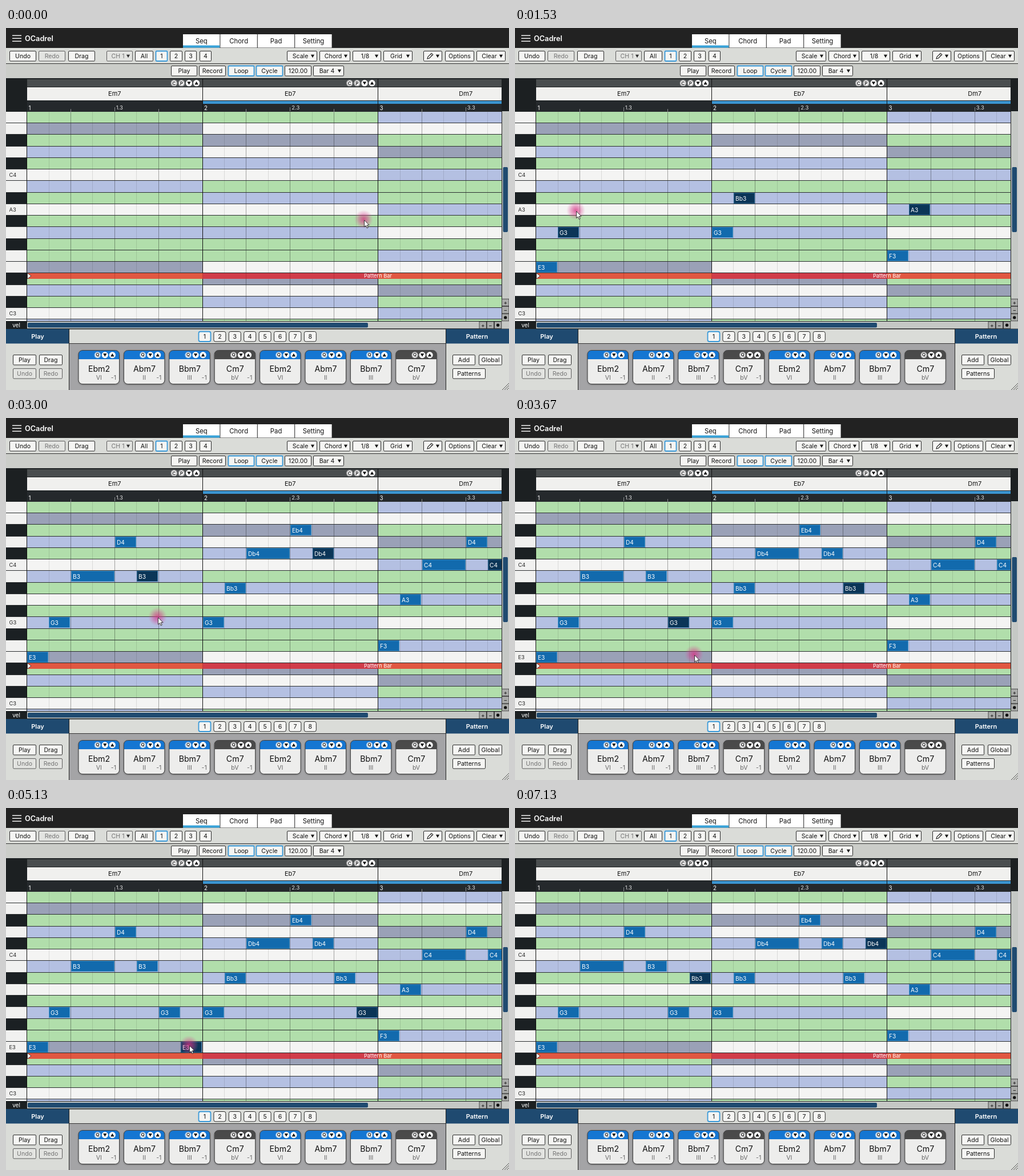
An HTML page with a canvas for the animation above (7.19 s loop, 881 by 635 pixels).

```html
<!DOCTYPE html>
<html lang="en">
<head>
<meta charset="utf-8">
<title>Sequencer</title>
<style>
html, body { margin: 0; width: 100%; height: 100%; overflow: hidden; background: #222; }
canvas { display: block; }
</style>
</head>
<body>
<canvas id="stage" width="881" height="635"></canvas>
<script>
const g = document.getElementById('stage').getContext('2d');
const LOOP = 7190, STEP = 1000 / 15;
const LEFT = 37, TOP = 145.8, RIGHT = 868, BOTTOM = 514;
const ROW = 20.25, BAR = 307.5, COL = BAR / 8;
const INK = '#1c2022', BLUE = '#3a9ad9', NAVY = '#1f4a70', PANEL = '#dadcd8', FACE = '#f5f5f3';
const PITCH = ['F', 'E', 'Eb', 'D', 'Db', 'C', 'B', 'Bb', 'A', 'Ab', 'G', 'Gb'];
const SHADE = { G: '#b1deab', B: '#b4c0e2', W: '#f4f4f3', D: '#9aa1b7' };
const BARS = ['GDGBGWBGWGBG', 'GWDWBWGBWGBG', 'BWGDGBGGBGWG'];

// column, length, press step, release step, row in each bar
const NOTES = [
  [0, 1, 15, 16, [13, 10, 12]],
  [1, 1, 20, 21, [10, 7, 8]],
  [2, 2, 26, 33, [6, 4, 5]],
  [4, 1, 37, 38, [3, 2, 3]],
  [5, 1, 43, 44, [6, 4, 5]],
  [6, 1, 50, 52, [10, 7, 8]],
  [7, 1, 57, 59, [13, 10, 12]]
];

// step, x, y of the pointer
const PATH = [
  [0, 627, 336], [10, 51, 420], [16, 51, 420], [19, 90, 356], [21, 92, 354],
  [25, 122, 287], [26, 124, 286], [32, 164, 283], [33, 167, 281], [36, 206, 221],
  [38, 208, 221], [41, 240, 280], [43, 242, 280], [45, 266, 349], [50, 277, 362],
  [52, 280, 364], [55, 314, 415], [67, 314, 415], [72, 326, 393], [77, 321, 416],
  [78, 321, 416], [85, 313, 299], [100, 313, 299], [106, 746, 154]
];

const rowY = r => Math.round(TOP + ROW * r);
const rowAt = y => Math.floor((y - TOP) / ROW);
const isBlack = r => PITCH[r % 12].length > 1;
const rowName = r => PITCH[r % 12] + (r < 6 ? 4 : r < 18 ? 3 : 2);

function rect(x, y, w, h, color) {
  g.fillStyle = color;
  g.fillRect(x, y, w, h);
}

function text(s, x, y, size, color = '#111', align = 'center', weight = 400) {
  g.font = `${weight} ${size}px Inter, sans-serif`;
  g.textAlign = align;
  g.fillStyle = color;
  g.fillText(s, x, y + size * 0.36);
}

function poly(points, fill, stroke, width = 1) {
  g.beginPath();
  points.forEach(([x, y]) => g.lineTo(x, y));
  g.closePath();
  if (fill) { g.fillStyle = fill; g.fill(); }
  if (stroke) { g.strokeStyle = stroke; g.lineWidth = width; g.stroke(); }
}

function line(x1, y1, x2, y2, color) {
  g.beginPath();
  g.moveTo(x1, y1);
  g.lineTo(x2, y2);
  g.strokeStyle = color;
  g.lineWidth = 1;
  g.stroke();
}

function triangle(x, y, r, dir, color) {
  poly([[x - r, y - r * 0.8 * dir], [x + r, y - r * 0.8 * dir], [x, y + r * 0.9 * dir]], color);
}

// style: 'on' has a blue frame, 'off' is greyed; a trailing ▼ makes a drop-down
function button(label, x1, x2, y, style, radius = 1.5, h = 17.5) {
  const menu = label.endsWith('▼'), off = style === 'off', on = style === 'on';
  g.beginPath();
  g.roundRect(x1 + 0.5, y + 0.5, x2 - x1 - 1, h, radius);
  g.fillStyle = off ? '#e3e4e1' : FACE;
  g.fill();
  g.lineWidth = on ? 1.8 : 1;
  g.strokeStyle = on ? BLUE : off ? '#5c5c5c' : '#2a2a2a';
  g.stroke();
  const cy = y + h / 2 + 0.6, color = off ? '#757575' : '#111';
  text(label.replace('▼', ''), (x1 + x2) / 2 - (menu ? 3 : 0), cy, 10.6, color);
  if (menu) triangle(x2 - 8, cy, 3.1, 1, off ? '#333' : '#111');
}

function badge(sign, x, y, color) {
  g.beginPath();
  g.arc(x, y, 5.6, 0, 7);
  g.fillStyle = '#fff';
  g.fill();
  if (sign === '▼' || sign === '▲') triangle(x, y, 3.2, sign === '▼' ? 1 : -1, '#111');
  else {
    g.beginPath();
    g.arc(x, y, 4.8, 0, 7);
    g.lineWidth = 0.6;
    g.strokeStyle = color;
    g.stroke();
    text(sign, x, y, 8, '#111', 'center', 600);
  }
}

function topBars() {
  rect(0, 0, 881, 35, '#222');
  for (const y of [12.5, 17.5, 22.5]) rect(11, y, 16, 1.4, '#fff');
  text('OCadrel', 33, 18.5, 12.7, '#fff', 'left', 600);
  ['Seq', 'Chord', 'Pad', 'Setting'].forEach((s, i) => {
    rect(310 + i * 65.4, 11, 64.4, 23.5, '#fff');
    text(s, 342.3 + i * 65.4, 23, 11.3);
  });
  rect(310, 30.5, 64.4, 4, '#38a3d9');

  rect(0, 35, 881, 27, PANEL);
  rect(0, 63, 881, 25, '#cbcdc9');
  rect(0, 62, 881, 1, '#333');
  [['Undo', 6, 53], ['Redo', 57, 104, 'off'], ['Drag', 109, 156], ['CH 1▼', 176, 222, 'off'],
   ['All', 226, 258], ['1', 262, 283, 'on'], ['2', 287, 309], ['3', 313, 334], ['4', 339, 360],
   ['Scale▼', 492, 545], ['Chord▼', 549, 603], ['1/8▼', 607, 657], ['Grid▼', 661, 712],
   ['▼', 731, 764], ['Options', 769, 820], ['Clear▼', 824, 875]
  ].forEach(([s, a, b, style]) => button(s, a, b, 40, style));
  poly([[738, 54], [739, 50.5], [745.3, 44.2], [747.8, 46.7], [741.5, 53]], null, '#222', 1.1);
  line(743.5, 46, 746, 48.5, '#222');
  [['Play', 289, 335], ['Record', 338, 385], ['Loop', 389, 435, 'on'], ['Cycle', 438, 485, 'on'],
   ['120.00', 488, 535], ['Bar 4▼', 538, 592]
  ].forEach(([s, a, b, style]) => button(s, a, b, 66, style));
}

function chordHeader() {
  rect(0, 88, 881, 58, INK);
  rect(LEFT, 90, RIGHT - LEFT, 13, '#4a4e4f');
  rect(LEFT, 104, RIGHT - LEFT, 23, '#f0f0ee');
  rect(LEFT, 128, RIGHT - LEFT, 18, '#25292c');
  rect(345, 128, RIGHT - 345, 5, '#3a94d0');
  ['Em7', 'Eb7', 'Dm7'].forEach((s, b) => {
    const x = LEFT + BAR * b;
    text(s, x + BAR / 2 - 0.5, 115.5, 11);
    text(b + 1, x + 2.5, 140, 9.8, '#fff', 'left');
    text(`${b + 1}.3`, x + BAR / 2 + 2, 140, 9.5, '#ddd', 'left');
    [1, 2, 3].forEach(i => rect(Math.floor(x + i * BAR / 4 - 0.5), i === 2 ? 139 : 142, 1, 7, '#8a8d8f'));
    if (b < 2) ['C', 'P', '▼', '▲'].forEach((c, i) => badge(c, x + 257.3 + i * 13.1, 96.7, '#333'));
    if (b) rect(Math.floor(x - 0.5), 89, 1, 57, '#111');
  });
}

function roll(hover) {
  g.save();
  g.beginPath();
  g.rect(0, 146, RIGHT, BOTTOM - 146);
  g.clip();
  for (let r = 0; r < 19; r++) {
    const y = rowY(r);
    rect(0, y, 36, 21, isBlack(r) ? '#1b2023' : '#f1f1f0');
    BARS.forEach((bar, b) => rect(LEFT + BAR * b, y, BAR, 21, SHADE[bar[r % 12]]));
  }
  for (let i = 1; i < 24; i++) {
    if (i % 8) rect(Math.floor(LEFT + i * COL - 0.4), 146, 1, 368, i % 2 ? 'rgba(0,0,0,.11)' : 'rgba(0,0,0,.34)');
  }
  for (let r = 0; r < 19; r++) rect(0, rowY(r), RIGHT, 1, '#2b2e30');
  for (const x of [36, 344, 651]) rect(x, 146, 1, 368, '#111');
  for (const r of new Set([5, 17, hover])) {
    if (r >= 0 && !isBlack(r)) text(rowName(r), 5.5, rowY(r) + 10.7, 9.3, '#222', 'left');
  }
  g.restore();
}

function drawNote(bar, col, len, row, dark) {
  const x = Math.round(LEFT + BAR * bar + COL * col), y = rowY(row) + 1;
  const w = Math.round(COL * len) - 1;
  rect(x, y, w, 19, dark ? '#0b3557' : '#126aad');
  g.strokeStyle = dark ? '#2b6a96' : '#4594c8';
  g.lineWidth = 1;
  g.strokeRect(x + 0.5, y + 0.5, w - 1, 18);
  text(rowName(row), x + 3, y + 10, 10.2, '#fff', 'left');
}

function notes(step, lift) {
  g.save();
  g.beginPath();
  g.rect(LEFT, 146, RIGHT - LEFT, BOTTOM - 146);
  g.clip();
  NOTES.forEach(([col, len, press, release, rows], i) => {
    if (step < press) return;
    const next = NOTES[i + 1], placed = step >= release;
    const dark = placed && (!next || step < next[2]);
    const size = len > 1 && step < 29 ? 1 : len;
    const up = next ? 0 : lift;
    rows.slice(0, placed ? 3 : 1).forEach((r, b) => drawNote(b, col, size, r - up, dark));
  });
  g.restore();
}

function patternBar() {
  rect(LEFT, 430, RIGHT - LEFT, 10, '#e05741');
  rect(344.5, 430, BAR, 10, '#d03c49');
  for (let i = 1; i < 11; i++) rect(Math.floor(LEFT + i * BAR / 4 - 0.4), 430, 1, 10, 'rgba(80,0,0,.2)');
  text('Pattern Bar', 651.5, 435, 9.3, '#fff');
  poly([[37.5, 430], [44, 435], [37.5, 440]], '#fff', '#222', 0.8);
}

function scrollBars() {
  rect(RIGHT, 146, 13, 382, '#c5c8c5');
  rect(0, BOTTOM, RIGHT, 14, INK);
  rect(RIGHT, 146, 1, 368, '#222');
  rect(LEFT, 515, 792, 12, '#c5c8c5');
  g.fillStyle = NAVY;
  g.beginPath();
  g.roundRect(870.5, 244, 8.5, 114, 2);
  g.roundRect(38, 517, 596, 8.5, 2);
  g.fill();
  text('vel', 18, 521, 10, '#fff');
  ['+', '−', '●'].forEach((s, i) => {
    const spots = [[868.5, 475.3 + i * 13.2], [829 + i * 13.2, 515]];
    for (const [x, y] of spots) {
      rect(x, y, 12.4, 12.2, '#a9aba9');
      g.strokeStyle = '#333';
      g.lineWidth = 0.8;
      g.strokeRect(x, y, 12.4, 12.2);
      if (i < 2) text(s, x + 6.2, y + 6.2, 10);
      else {
        g.beginPath();
        g.arc(x + 6.2, y + 6.2, 2.7, 0, 7);
        g.fillStyle = '#111';
        g.fill();
      }
    }
  });
}

function card(i) {
  const x = 127 + i * 79.4, y = 565.5, w = 71.5, h = 59, kind = i % 4;
  const head = kind === 3 ? '#4a4a4a' : '#1576d2';
  g.save();
  g.beginPath();
  g.roundRect(x, y, w, h, 7);
  g.shadowColor = 'rgba(0,0,0,.45)';
  g.shadowBlur = 3;
  g.shadowOffsetY = 1;
  g.fillStyle = '#ededec';
  g.fill();
  g.shadowColor = 'transparent';
  g.clip();
  rect(x, y, w, 15.5, head);
  g.restore();
  g.beginPath();
  g.roundRect(x, y, w, h, 7);
  g.lineWidth = 1;
  g.strokeStyle = '#3c3c3c';
  g.stroke();
  ['Q', '▼', '▲'].forEach((s, k) => badge(s, x + 33.3 + k * 13, 573.6, head));
  text(['Ebm2', 'Abm7', 'Bbm7', 'Cm7'][kind], x + w / 2 + 0.3, 597.5, 14.2);
  text(['VI', 'II', 'III', 'bV'][kind], x + w / 2, 613.5, 10.6, '#666');
  if (i < 4) text('-1', x + 66, 613.5, 10.6, '#666', 'right');
}

function bottomPanel() {
  rect(0, 528, 881, 107, PANEL);
  rect(111, 554, 659, 81, '#a4a4a6');
  rect(0, 527.5, 881, 1, '#222');
  rect(111, 553, 659, 1, '#333');
  rect(0, 528, 110, 25.5, NAVY);
  rect(771, 528, 110, 25.5, NAVY);
  rect(110, 528, 1, 107, '#222');
  rect(770, 528, 1, 107, '#222');
  text('Play', 55.5, 541, 11, '#fff', 'center', 600);
  text('Pattern', 825, 541, 11, '#fff', 'center', 600);
  for (let i = 0; i < 8; i++) {
    const x = 337 + i * 26.4;
    button(String(i + 1), x, x + 22, 532, i ? '' : 'on', 3);
    card(i);
  }
  [['Play', 12, 53, 573], ['Drag', 58, 99, 573], ['Undo', 12, 53, 597, 'off'], ['Redo', 58, 99, 597, 'off'],
   ['Add', 782, 822, 573], ['Global', 828, 869, 573], ['Patterns', 782, 840, 597]
  ].forEach(([s, a, b, y, style]) => button(s, a, b, y, style));
  for (const d of [4, 8, 12]) line(881 - d, 635, 881, 635 - d, '#555');
}

function pointer(step) {
  let i = PATH.findIndex(p => p[0] >= step);
  if (i < 1) i = 1;
  const [s0, x0, y0] = PATH[i - 1], [s1, x1, y1] = PATH[i];
  let u = (step - s0) / (s1 - s0);
  if (s1 - s0 > 4) u = u * u * (3 - 2 * u);
  return [x0 + (x1 - x0) * u, y0 + (y1 - y0) * u];
}

function drawPointer(x, y) {
  const glow = g.createRadialGradient(x - 0.5, y - 0.5, 0, x - 0.5, y - 0.5, 16.5);
  glow.addColorStop(0, 'rgba(214,50,130,.78)');
  glow.addColorStop(0.5, 'rgba(214,60,140,.42)');
  glow.addColorStop(1, 'rgba(220,90,160,0)');
  rect(x - 17, y - 17, 34, 34, glow);
  const arrow = [[0, 0], [0, 12], [2.8, 9.5], [4.7, 14], [6.7, 13.1], [4.8, 8.8], [8.5, 8.6]];
  poly(arrow.map(([a, b]) => [x + a + 0.5, y + b + 1]), '#fff', '#222', 0.9);
}

function draw(step) {
  const shown = step < 107, [x, y] = pointer(step);
  const dragging = step > 78 && step < 101;
  const hover = !shown ? -1 : step === 0 ? 8 : dragging ? 13 : rowAt(y);
  const lift = step < 79 ? 0 : step < 101 ? 13 - rowAt(y) : 6;
  roll(hover);
  notes(step, lift);
  patternBar();
  topBars();
  chordHeader();
  scrollBars();
  bottomPanel();
  if (shown) drawPointer(x, y);
}

let last = -1;
function tick() {
  const step = Math.floor((performance.now() % LOOP + 4) / STEP);
  if (step !== last) draw(last = step);
  requestAnimationFrame(tick);
}
tick();
</script>
</body>
</html>
```
